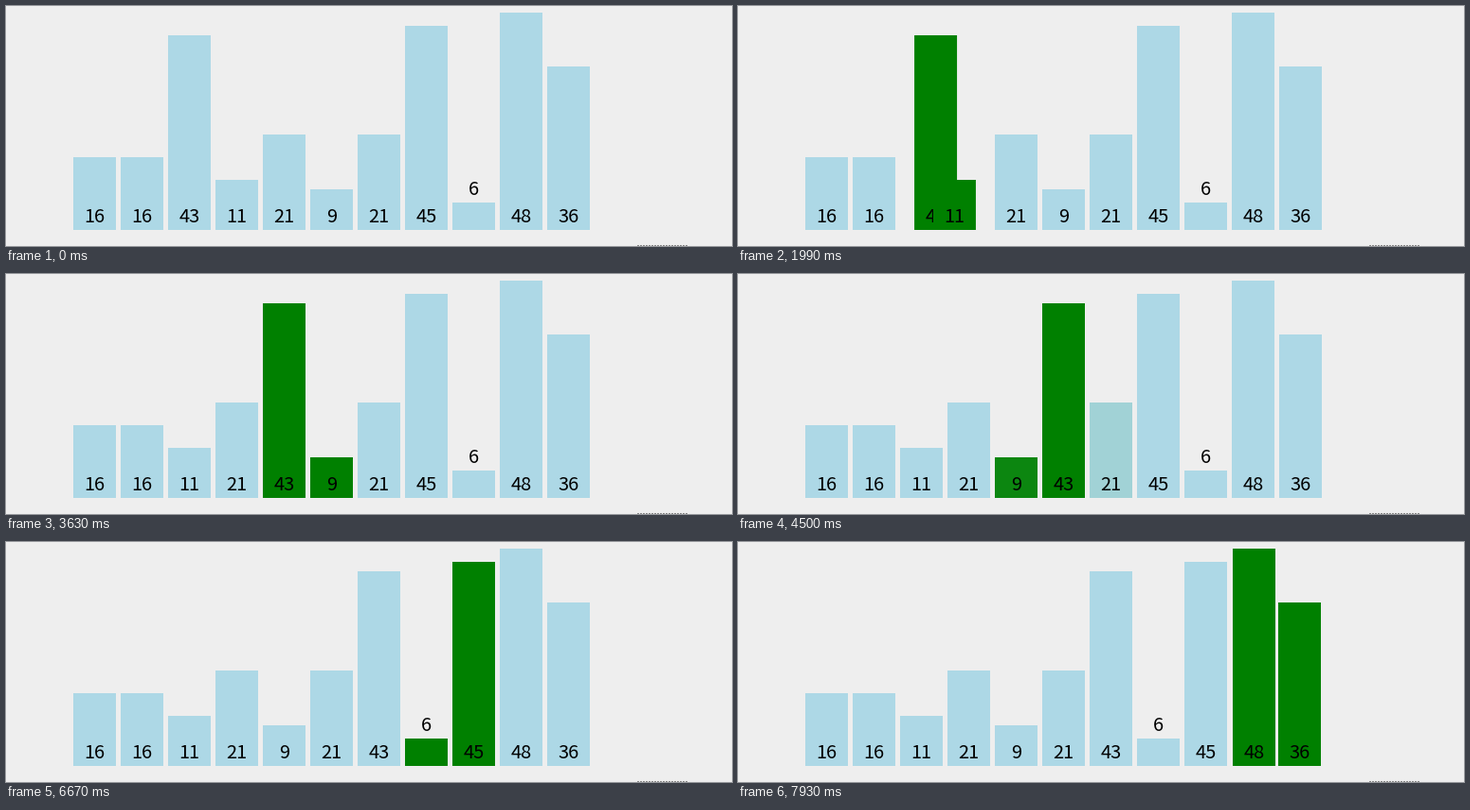
A matplotlib script that plays this animation: 766 by 254 pixels, repeating every 8 s.

```python
import math

import matplotlib.pyplot as plt
from matplotlib.animation import FuncAnimation
from matplotlib.patches import Rectangle

WIDTH, HEIGHT, DPI = 766, 254, 100
LOOP_MS, INTERVAL = 8000, 20
VALUES = [16, 16, 43, 11, 21, 9, 21, 45, 6, 48, 36]
LEFT, PITCH, BAR_W, BASE, SCALE = 71, 50, 45, 237, 4.8
LIGHT, GREEN = (173, 216, 230), (0, 128, 0)
DURATION = 200

# Each action: time already elapsed at its first tick, then the ticks (ms).
TIMING = [
    (36, 530, 600, 680), (36, 1000, 1070, 1150),
    (6, 1460, 1530, 1610, 1690), (4, 1920, 1990, 2070, 2150),
    (36, 2450, 2530, 2610), (10, 2910, 3000, 3090, 3160),
    (109, 3560, 3630), (8, 3940, 4020, 4100, 4180),
    (34, 4500, 4570, 4650), (36, 4970, 5040, 5120),
    (109, 5510, 5590), (109, 5970, 6050),
    (8, 6430, 6510, 6590, 6670), (36, 6990, 7060, 7140),
    (36, 7460, 7530, 7610), (18, 7930, 8010),
]


def bubble_pass():
    """Yield the highlights and swaps of one bubble-sort pass, by bar id."""
    order = list(range(len(VALUES)))
    active = set()
    for i in range(len(order) - 1):
        a, b = order[i], order[i + 1]
        yield "highlight", active - {a, b}, {a, b} - active
        active = {a, b}
        if VALUES[a] > VALUES[b]:
            yield "swap", {a}, {b}
            order[i], order[i + 1] = b, a


ACTIONS = list(bubble_pass())


def progress(t, lead, *ticks):
    passed = [tick for tick in ticks if tick <= t]
    if not passed:
        return 0.0
    if len(passed) == len(ticks):
        return 1.0
    u = min(1.0, (lead + passed[-1] - ticks[0]) / DURATION)
    return 0.5 - 0.5 * math.cos(math.pi * u)


def state(t):
    slots = [float(i) for i in range(len(VALUES))]
    levels = [0.0] * len(VALUES)
    for (kind, first, second), timing in zip(ACTIONS, TIMING):
        p = progress(t, *timing)
        for ids, sign in ((first, 1), (second, -1)):
            for i in ids:
                if kind == "swap":
                    slots[i] += sign * p
                else:
                    levels[i] -= sign * p
    return slots, levels


def mix(level):
    return tuple(min(1, max(0, (a + (b - a) * level) / 255))
                 for a, b in zip(LIGHT, GREEN))


fig = plt.figure(figsize=(WIDTH / DPI, HEIGHT / DPI), dpi=DPI, facecolor="#eeeeee")
ax = fig.add_axes([0, 0, 1, 1])
ax.set_xlim(0, WIDTH)
ax.set_ylim(HEIGHT, 0)
ax.axis("off")

bars, labels = [], []
for i, value in enumerate(VALUES):
    top = round(BASE - value * SCALE)
    bars.append(ax.add_patch(Rectangle((0, top), BAR_W, BASE - top, lw=0,
                                       snap=False, zorder=2 * i + 1)))
    baseline = BASE - 8 if value > 8 else top - 8
    labels.append(ax.text(0, baseline, str(value), ha="center", va="baseline",
                          family="Noto Sans CJK JP", fontsize=20 * 72 / DPI,
                          color="black", zorder=2 * i + 2))

# Dotted edge at the bottom of the stage
for x in range(666, 719, 3):
    ax.add_patch(Rectangle((x, 253), 2, 1, lw=0, color="#888888", snap=False))


def update(frame):
    slots, levels = state(frame * INTERVAL + INTERVAL / 2)
    for bar, label, slot, level in zip(bars, labels, slots, levels):
        x = LEFT + PITCH * slot
        bar.set_x(x)
        bar.set_facecolor(mix(level))
        label.set_x(x + BAR_W / 2)
    return bars + labels


anim = FuncAnimation(fig, update, frames=LOOP_MS // INTERVAL,
                     interval=INTERVAL, repeat=True, repeat_delay=0)
plt.show()
```
